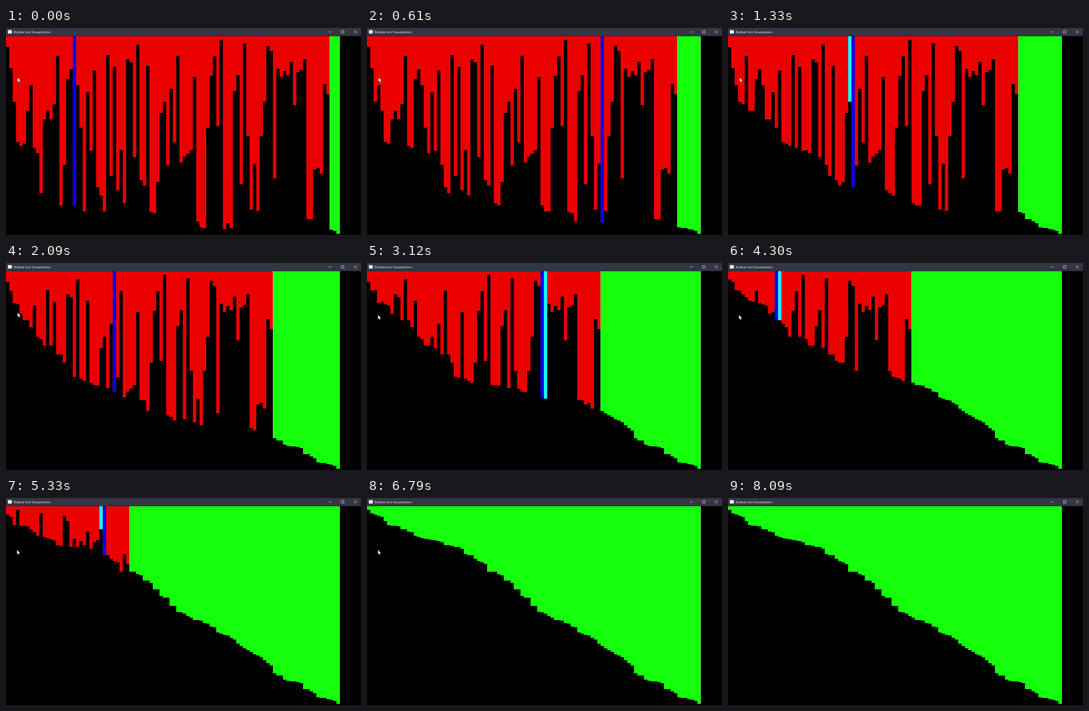
Recreate the animation shown at these times as an HTML page. Size 600x351 px, loop 8.51 s.

```html
<!DOCTYPE html>
<html lang="en">
<head>
<meta charset="utf-8">
<title>Bubble Sort Visualization</title>
<style>
html, body { margin: 0; width: 100%; height: 100%; overflow: hidden; background: #000; }
svg { display: block; width: 100vw; height: 100vh; }
text { font: 5.4px "Open Sans", "Noto Sans", sans-serif; fill: #f4f4f6; }
</style>
</head>
<body>
<svg viewBox="0 0 600 351">
  <rect width="600" height="351"/>
  <path id="red" fill="#eb0000"/>
  <path id="green" fill="#14ff0a"/>
  <path id="edges" stroke="#c8ffc8" stroke-width=".7" fill="none" opacity=".75"/>
  <path id="blue" fill="#0000f2"/>
  <path id="cyan" fill="#18f4ff"/>
  <rect width="600" height="13.7" fill="#343643"/>
  <rect x="3.2" y="3.6" width="6.6" height="5.8" fill="#f2f4f6"/>
  <text x="13" y="8.6">Bubble Sort Visualization</text>
  <rect id="hover" x="579" width="21" height="13.7" fill="#e81123" opacity="0"/>
  <path d="M545.6 6.7h4.6M567 4.5h4.2v4.2h-4.2zM588.2 4.3l4.6 4.6m0-4.6l-4.6 4.6" fill="none" stroke="#e6e6ea" stroke-width=".7"/>
  <path id="cursor" d="M0 0v7.6l1.8-1.6 1.2 2.7 1.2-.5-1.2-2.7h2.4z" fill="#fff" stroke="#111" stroke-width=".35"/>
</svg>
<script>
const LOOP = 8510, COUNT = 100, BAR = 5.64, TOP = 13.7, TICK = 30;

// Lower edge of each bar when the loop begins
const START = [
  32, 68, 125, 193, 200, 196, 140, 97, 203, 212, 280, 155, 140, 155, 129, 47, 301, 232, 86, 70,
  301, 97, 169, 311, 109, 208, 72, 270, 284, 311, 46, 251, 66, 275, 207, 297, 53, 58, 219, 28,
  258, 267, 64, 312, 314, 261, 144, 125, 233, 103, 194, 47, 228, 218, 213, 207, 83, 328, 338, 339,
  169, 81, 48, 166, 20, 341, 331, 339, 107, 80, 265, 26, 183, 308, 230, 310, 183, 125, 30, 39,
  255, 69, 83, 73, 80, 57, 131, 75, 71, 53, 324, 324, 240, 237, 247, 95, 112, 342, 344, 349
];
const FIRST = { step: 314, sorted: 3, pos: 20 };

// [time, comparisons made]; a half means the pair is being compared
const PACE = [
  [0, 314], [610, 742], [2090, 1822], [3120, 2587.5], [3150, 2587.5],
  [4300, 3479.5], [5330, 4312.5], [6120, 4950]
];

// [time, x, y]
const POINTER = [
  [0, 19.5, 84], [2700, 19.5, 84], [2790, 18.5, 88], [6790, 18.5, 88],
  [6940, 6, 81], [7550, 587, 4], [7940, 587, 4]
];

const el = id => document.getElementById(id);
const draw = (id, d) => el(id).setAttribute("d", d);
const clamp = v => Math.max(0, Math.min(1, v));
const ease = k => k * k * (3 - 2 * k);

function segment(keys, t) {
  let i = 0;
  while (i < keys.length - 2 && t >= keys[i + 1][0]) i++;
  return [keys[i], keys[i + 1]];
}

function progress(t) {
  if (t >= 6120) return 4950;
  const [a, b] = segment(PACE, t);
  let tick = Math.floor((t - a[0]) / TICK);
  if (tick % 5 === 4) tick--;
  const steps = a[1] + (b[1] - a[1]) * tick * TICK / (b[0] - a[0]);
  return Math.floor(steps * 2 + 1e-6) / 2;
}

function sortTo(steps) {
  const bars = START.slice();
  let { step, sorted, pos } = FIRST;
  const compare = () => {
    const swap = bars[pos] > bars[pos + 1];
    if (swap) [bars[pos], bars[pos + 1]] = [bars[pos + 1], bars[pos]];
    return swap;
  };
  for (; step < Math.floor(steps); step++) {
    compare();
    if (++pos >= COUNT - 1 - sorted) {
      pos = 0;
      sorted++;
    }
  }
  if (sorted >= COUNT - 1) return { bars, sorted: COUNT, blue: -1, cyan: -1 };
  let blue = pos, cyan = -1;
  if (steps % 1) {
    const swap = compare();
    blue = swap ? pos + 1 : pos;
    cyan = swap ? pos : pos + 1;
  }
  return { bars, sorted, blue, cyan };
}

function shape(bars, from, to) {
  if (from < 0 || from >= to) return "";
  let d = `M${from * BAR} ${TOP}`;
  for (let i = from; i < to; i++) d += `V${bars[i]}H${(i + 1) * BAR}`;
  return d + `V${TOP}z`;
}

function pointer(t) {
  const [a, b] = segment(POINTER, t);
  const k = ease(clamp((t - a[0]) / (b[0] - a[0])));
  return [a[1] + (b[1] - a[1]) * k, a[2] + (b[2] - a[2]) * k];
}

let shown = -1;

function render(t) {
  const steps = progress(t);
  if (steps !== shown) {
    shown = steps;
    const { bars, sorted, blue, cyan } = sortTo(steps);
    const split = COUNT - sorted;
    draw("red", shape(bars, 0, split));
    draw("green", shape(bars, split, COUNT));
    draw("blue", shape(bars, blue, blue + 1));
    draw("cyan", shape(bars, cyan, cyan + 1));
    const right = `M${COUNT * BAR - .3} ${TOP}V${bars[COUNT - 1]}`;
    draw("edges", split ? `M${split * BAR + .3} ${TOP}V${bars[split]}${right}` : right);
  }
  const [x, y] = pointer(t);
  el("cursor").setAttribute("transform", `translate(${x} ${y})`);
  el("cursor").setAttribute("visibility", t < 7940 ? "visible" : "hidden");
  el("hover").setAttribute("opacity", x > 579 ? 1 - clamp((t - 7940) / 150) : 0);
}

function frame() {
  render(performance.now() % LOOP);
  requestAnimationFrame(frame);
}
frame();
</script>
</body>
</html>
```
